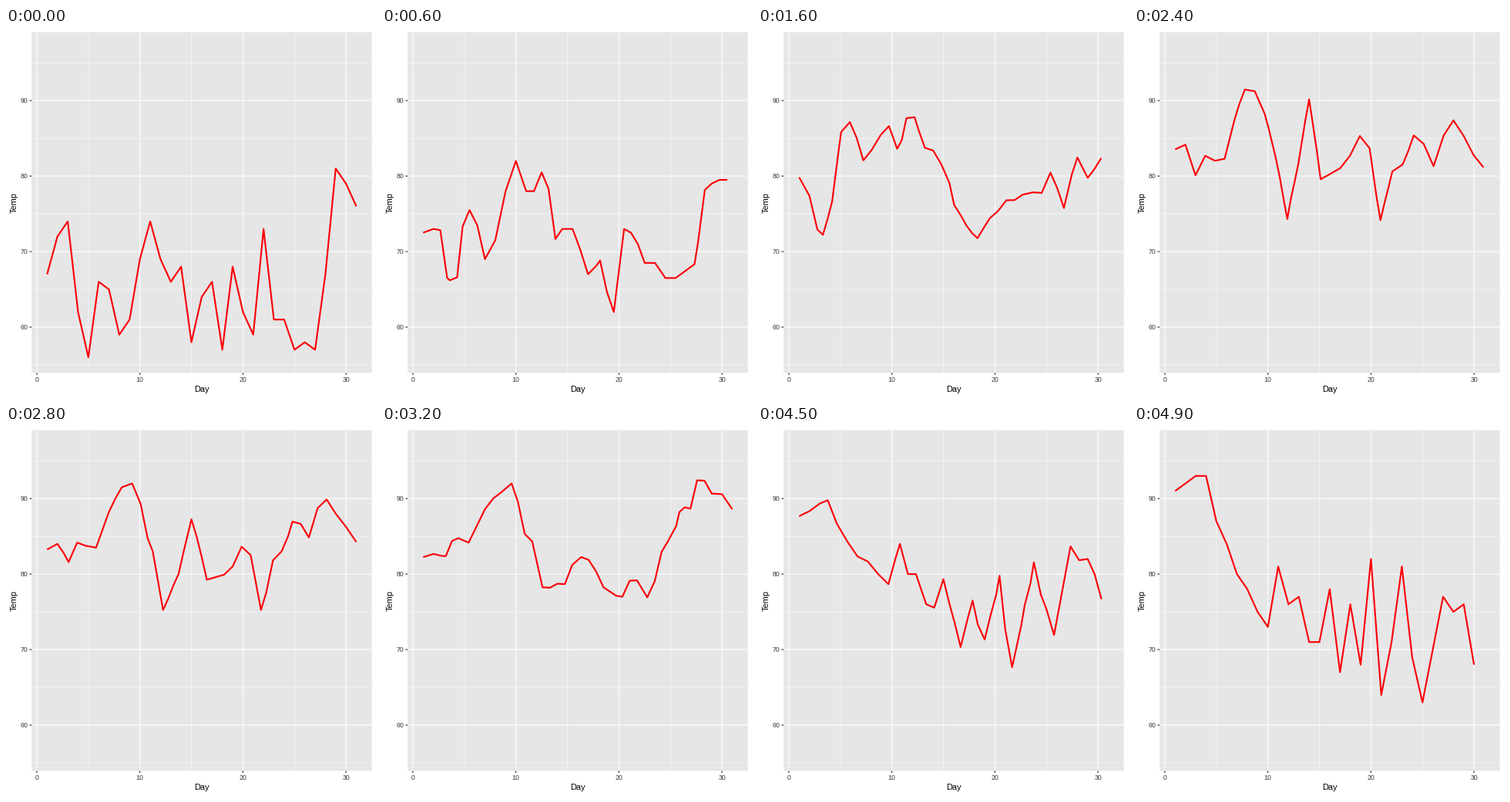
Write a matplotlib script that moves like this. It is 480x480 px and loops after 5 s.

```python
import matplotlib.pyplot as plt
import numpy as np
from matplotlib.animation import FuncAnimation
from matplotlib.patches import Rectangle

plt.rcParams["font.family"] = "Liberation Sans"

SIZE, DPI = 480, 72
FRAMES, INTERVAL = 50, 100
LEFT, RIGHT, TOP, BOTTOM = 33.3, 474.52, 5.48, 447.3
X_MIN, X_MAX, Y_MIN, Y_MAX = -0.5, 32.5, 53.95, 99.05
PANEL, RED, TICK, LABEL = "#e6e6e6", "#fb0007", "#242424", "#3b3b3b"

# Daily temperatures for five months, two digits per day.
MONTHS = [
    "67 72 74 62 56 66 65 59 61 69 74 69 66 68 58 64 66 57 68 62 59 73 61 61 57 58 57 67 81 79 76",
    "78 74 67 84 85 79 82 87 90 87 93 92 82 80 79 77 72 65 73 76 77 76 76 76 75 78 73 80 77 83",
    "84 85 81 84 83 83 88 92 92 89 82 73 81 91 80 81 82 84 87 85 74 81 82 86 85 82 86 88 86 83 81",
    "81 81 82 86 85 87 89 90 90 92 86 86 82 80 79 77 79 76 78 78 77 72 75 79 81 86 88 97 94 96 94",
    "91 92 93 93 87 84 80 78 75 73 81 76 77 71 71 78 67 76 68 82 64 71 81 69 63 70 77 75 76 68",
]
KEY_FRAMES = [0, 12, 25, 37, 49]
PATH_POINTS = 50
# Priority of a segment's length after it has been cut 0, 1, 2, ... times.
CUT_WEIGHTS = np.array([1, 0.64, 0.35, 0.25, 0.2, 0])


def px(day):
    return LEFT + (day - X_MIN) / (X_MAX - X_MIN) * (RIGHT - LEFT)


def py(temp):
    return BOTTOM - (temp - Y_MIN) / (Y_MAX - Y_MIN) * (BOTTOM - TOP)


def densify(temps):
    """Cut the long segments evenly until the path has PATH_POINTS points."""
    days = np.arange(1, len(temps) + 1)
    lengths = np.sqrt(1 + np.diff(temps) ** 2)
    cuts = np.zeros(len(lengths), int)
    for _ in range(PATH_POINTS - len(temps)):
        cuts[np.argmax(lengths * CUT_WEIGHTS[cuts])] += 1
    x = np.concatenate(
        [day + np.arange(n + 1) / (n + 1) for day, n in zip(days, cuts)] + [days[-1:]]
    )
    return np.column_stack([x, np.interp(x, days, temps)])


paths = [densify(np.array(month.split(), float)) for month in MONTHS]

fig = plt.figure(figsize=(SIZE / DPI, SIZE / DPI), dpi=DPI, facecolor="white")
ax = fig.add_axes([0, 0, 1, 1])
ax.set_xlim(0, SIZE)
ax.set_ylim(SIZE, 0)
ax.axis("off")


def stroke(xs, ys, color, width, z):
    return ax.plot(xs, ys, color=color, lw=width, zorder=z, snap=False,
                   solid_capstyle="butt", solid_joinstyle="round")[0]


def write(x, y, text, size, color, **align):
    ax.text(x, y, text, fontsize=size, color=color, va="baseline", **align)


ax.add_patch(Rectangle((LEFT, TOP), RIGHT - LEFT, BOTTOM - TOP,
                       facecolor=PANEL, lw=0, snap=False))

for day in (5, 15, 25):
    stroke([px(day)] * 2, [TOP, BOTTOM], "white", 0.53, 2)
for temp in (55, 65, 75, 85, 95):
    stroke([LEFT, RIGHT], [py(temp)] * 2, "white", 0.53, 2)
for day in (0, 10, 20, 30):
    stroke([px(day)] * 2, [TOP, BOTTOM], "white", 1.07, 3)
    stroke([px(day)] * 2, [BOTTOM, BOTTOM + 2.74], TICK, 1.07, 3)
    write(px(day), 458.9, str(day), 8.8, LABEL, ha="center")
for temp in (60, 70, 80, 90):
    stroke([LEFT, RIGHT], [py(temp)] * 2, "white", 1.07, 3)
    stroke([LEFT - 2.74, LEFT], [py(temp)] * 2, TICK, 1.07, 3)
    write(LEFT - 4.94, py(temp) + 3.2, str(temp), 8.8, LABEL, ha="right")

write((LEFT + RIGHT) / 2, 472, "Day", 11, "black", ha="center")
ax.text(13.4, (TOP + BOTTOM) / 2, "Temp", fontsize=11, color="black", rotation=90,
        rotation_mode="anchor", ha="center", va="baseline")

line = stroke([], [], RED, 2.13, 4)


def update(frame):
    k = min(np.searchsorted(KEY_FRAMES, frame, side="right") - 1, len(paths) - 2)
    t = (frame - KEY_FRAMES[k]) / (KEY_FRAMES[k + 1] - KEY_FRAMES[k])
    day, temp = ((1 - t) * paths[k] + t * paths[k + 1]).T
    line.set_data(px(day), py(temp))
    return (line,)


anim = FuncAnimation(fig, update, frames=FRAMES, interval=INTERVAL, repeat=True,
                     repeat_delay=0, blit=False)
plt.show()
```
